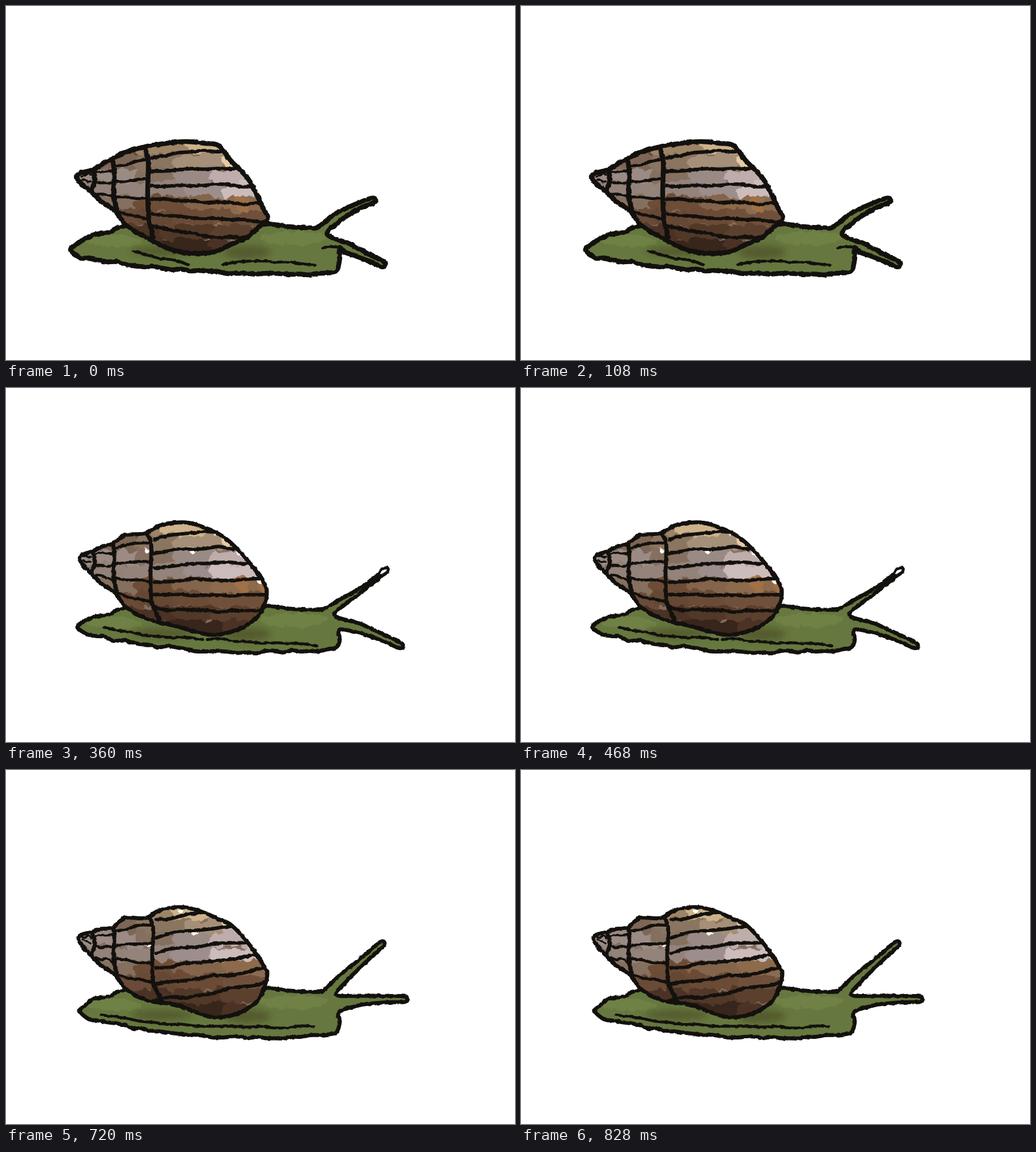
Recreate the animation shown at these times as an HTML page. Size 898 px wide and 624 px high, loop 0.9 s.

```html
<!DOCTYPE html>
<html lang="en">
<head>
<meta charset="utf-8">
<title>Crawling snail</title>
<style>
html, body { margin: 0; width: 100%; height: 100%; overflow: hidden; background: #fff; }
svg { display: block; width: 100%; height: 100%; }
.pose { opacity: 0; animation: pose 900ms step-end infinite; }
.ink { fill: none; stroke: #13110e; stroke-linecap: round; stroke-linejoin: round; }
@keyframes pose { 0% { opacity: 1; } 20%, 100% { opacity: 0; } }
</style>
</head>
<body>
<svg id="stage" viewBox="0 0 898 624">
  <defs>
    <filter id="rough" filterUnits="userSpaceOnUse" x="0" y="0" width="898" height="624" color-interpolation-filters="sRGB">
      <feTurbulence type="fractalNoise" baseFrequency=".13" numOctaves="2" seed="4" result="noise"/>
      <feDisplacementMap in="SourceGraphic" in2="noise" scale="4" xChannelSelector="R" yChannelSelector="G"/>
    </filter>
    <filter id="brush" filterUnits="userSpaceOnUse" x="0" y="0" width="898" height="624" color-interpolation-filters="sRGB">
      <feTurbulence type="fractalNoise" baseFrequency=".07" numOctaves="2" seed="9" result="noise"/>
      <feDisplacementMap in="SourceGraphic" in2="noise" scale="14" xChannelSelector="R" yChannelSelector="G"/>
    </filter>
    <filter id="soft" filterUnits="userSpaceOnUse" x="0" y="0" width="898" height="624">
      <feGaussianBlur stdDeviation="6"/>
    </filter>
  </defs>
</svg>
<script>
// Key points of each pose; everything between them follows from the rules below.
// horns: tip x, tip y, bend. folds: start, end, sag. bands: count, left y range, right y range.
const poses = [
  {
    pen: 8.5, apex: [125, 301], notch: 0, crown: [318, 239], shoulder: 246, edge: 357, rim: [462, 375], cheek: 408, belly: 432,
    seam: 0, bands: [6, [268, 390], [256, 412]], gaps: [],
    tail: [114, 430], fork: [567, 403], foot: 472, sag: 2, ripple: 2,
    horns: [[652, 341, -6], [669, 457, 0]],
    folds: [[225, 432, 322, 455, 0], [382, 456, 545, 456, -6], [559, 425, 597, 431, -3]]
  },
  {
    pen: 7, apex: [118, 303], notch: 6, crown: [305, 241], shoulder: 258, edge: 346, rim: [462, 363], cheek: 417, belly: 423,
    seam: 0, bands: [6, [264, 386], [262, 418]], gaps: [[254, 312], [302, 248], [336, 430]],
    tail: [114, 417], fork: [578, 402], foot: 461, sag: 11, ripple: 3,
    horns: [[671, 350, -5], [707, 461, 0]],
    folds: [[173, 428, 295, 440, 3], [362, 447, 538, 452, 3], [577, 422, 600, 427, 0]]
  },
  {
    pen: 7, apex: [129, 300], notch: 8, crown: [318, 237], shoulder: 257, edge: 341, rim: [460, 365], cheek: 418, belly: 420,
    seam: 5, bands: [6, [266, 389], [256, 390]], gaps: [[327, 286], [250, 285], [416, 293], [450, 341]],
    tail: [126, 422], fork: [580, 401], foot: 462, sag: 7, ripple: 2.5, eye: true,
    horns: [[672, 320, 4], [700, 456, -3]],
    folds: [[172, 420, 347, 442, 5], [355, 442, 548, 453, 1]]
  },
  {
    pen: 7.5, apex: [129, 304], notch: 8, crown: [328, 241], shoulder: 256, edge: 338, rim: [465, 378], cheek: 424, belly: 423,
    seam: 3, bands: [7, [270, 403], [254, 392]], gaps: [[325, 288], [446, 393]],
    tail: [123, 425], fork: [582, 398], foot: 465, sag: 14, ripple: 4,
    horns: [[669, 302, 2], [706, 406, -2]],
    folds: [[182, 424, 527, 452, 11]]
  },
  {
    pen: 7, apex: [127, 297], notch: 13, crown: [315, 242], shoulder: 263, edge: 344, rim: [461, 362], cheek: 421, belly: 414,
    seam: 8, bands: [6, [266, 405], [250, 372]], gaps: [[332, 284], [251, 311], [308, 247]],
    tail: [130, 425], fork: [583, 396], foot: 467, sag: 9, ripple: 2,
    horns: [[667, 303, 0], [708, 404, -2]],
    folds: [[168, 433, 543, 451, 10]]
  }
];

// Shell tones by column, from top to bottom.
const tones = [
  [200, '#694e3b #7d6655 #9b8b84 #93827a #85705f #6a4b37 #543a2b #4b3225'],
  [275, '#9d8466 #8a7560 #85705f #94837b #6d4d36 #654833 #4b3225 #38251c'],
  [335, '#cdb28a #a58f78 #9a8a86 #9d8e8c #84644b #6b4b35 #523827 #38251c'],
  [410, '#edd3ab #e5caa4 #bfadab #cdbcbc #8d6a4b #70503a #5c402e #4b3225']
].map(([x, row]) => [x, row.split(' ')]);

function random(seed) {
  return () => {
    seed = (seed * 16807) % 2147483647;
    return seed / 2147483647;
  };
}

const mix = (a, b, t) => a + (b - a) * t;
const range = n => Array.from({ length: n }, (_, i) => i);

// Smooth curve through the points, as cubic segments.
function curve(p, closed) {
  const n = p.length;
  const at = i => closed ? p[(i + n) % n] : p[Math.max(0, Math.min(n - 1, i))];
  let d = 'M' + p[0];
  for (let i = 0; i < (closed ? n : n - 1); i++) {
    const [a, b, c, e] = [at(i - 1), at(i), at(i + 1), at(i + 2)];
    const h1 = b.map((v, k) => v + (c[k] - a[k]) / 6);
    const h2 = c.map((v, k) => v - (e[k] - b[k]) / 6);
    d += `C${h1} ${h2} ${c}`;
  }
  return closed ? d + 'Z' : d;
}

const ink = (d, w) => `<path class="ink" stroke-width="${w}" d="${d}"/>`;
const blob = (x, y, rx, ry, color, turn = 0) =>
  `<ellipse rx="${rx}" ry="${ry}" fill="${color}" transform="translate(${x} ${y}) rotate(${turn})"/>`;

function shellPoints({ apex: [ax, ay], notch, crown: [cx, cy], shoulder, edge, rim, cheek, belly }) {
  return [
    [ax, ay], [ax + 7, ay - 7], [150, ay - 11], [168, 280], [188, 269 + notch * .7], [210, 258 + notch * .2],
    [246, 248 + notch], [275, cy + 4], [cx, cy], [350, mix(cy, shoulder, .45)], [375, shoulder], [397, 273],
    [428, 306], [454, edge], rim, [448, cheek - 20], [425, cheek], [400, cheek + 11], [360, 435],
    [300, belly], [252, mix(405, belly, .2)], [214, 388], [193, 362], [170, 346], [150, 327], [ax + 7, ay + 12]
  ];
}

// Both sides of a tapering horn, from root to tip and back.
function horn([rx, ry], [tx, ty, bend], thin) {
  const len = Math.hypot(tx - rx, ty - ry);
  const nx = (ty - ry) / len, ny = (rx - tx) / len;
  const side = (t, s) => {
    const w = s * (thin + 6 * (1 - t) ** 2);
    return [mix(rx, tx, t) + nx * w, mix(ry, ty, t) + ny * w + bend * Math.sin(Math.PI * t)];
  };
  const steps = [.25, .45, .7, .95];
  return [...steps.map(t => side(t, 1)), [tx, ty], ...steps.reverse().map(t => side(t, -1))];
}

function bodyPoints({ tail: [tx, ty], fork: [fx, fy], foot, sag, ripple, horns, eye }, rnd) {
  const sole = range(28).map(i => {
    const u = (i + .3) / 28;
    const y = mix(foot, ty + 11, u ** 2.2) + sag * Math.sin(Math.PI * u);
    return [mix(572, tx + 6, u), y + (rnd() - .5) * 2 * ripple];
  });
  return [
    [tx, ty], [tx + 9, ty - 9], [152, 404], [182, 399], [207, 388], [300, 370], [440, 384],
    [463, 384], [500, 389], [fx - 30, 391], [fx - 17, fy - 13],
    ...horn([fx - 10, fy - 10], horns[0], eye ? 2.5 : 4.5), [fx, fy],
    ...horn([fx + 12, fy + 13], horns[1], 5),
    [588, 426], [589, 444], [583, foot - 5], ...sole
  ];
}

// A hand-drawn line that bows by sag.
function stroke(x0, y0, x1, y1, sag, shake, rnd) {
  const n = Math.max(3, Math.round((x1 - x0) / 24));
  return curve(range(n + 1).map(i => {
    const t = i / n;
    return [mix(x0, x1, t), mix(y0, y1, t) + sag * Math.sin(Math.PI * t) + (rnd() - .5) * shake];
  }));
}

// Lines spread evenly between two seams; the upper ones arch, the lower ones hang.
function fan(n, x0, x1, left, right, arch, w, rnd) {
  return range(n).map(i => {
    const t = i / (n - 1);
    return ink(stroke(x0, mix(...left, t), x1, mix(...right, t), mix(-arch, arch / 2, t), 5, rnd), w);
  }).join('');
}

function dabs(rnd) {
  let out = '';
  for (let row = 0; row < 8; row++) {
    for (let x = 115; x < 475; x += 22) {
      const px = x + (rnd() - .5) * 34;
      const near = tones.reduce((a, b) => Math.abs(b[0] - px) < Math.abs(a[0] - px) ? b : a);
      const orange = row === 4 && x > 405 && rnd() < .6;
      out += blob(x, 250 + row * 25 + (rnd() - .5) * 10, 21, 14, orange ? '#a07046' : near[1][row], rnd() * 40 - 10);
    }
  }
  return out;
}

function draw(p, i) {
  const rnd = random(4111 * (i + 3));
  const body = curve(bodyPoints(p, rnd), true);
  const shell = curve(shellPoints(p), true);
  const [ax, ay] = p.apex;
  const s = p.seam;
  const [n, left, right] = p.bands;
  const [ex, ey] = p.horns[0];
  const seams = [
    [[246, 254], [251 + s, 275], [250 + s, 330], [252 + s, 375], [260 + s * 2, 408]],
    [[188, 268], [191, 295], [190, 330], [196, 364]],
    [[153, 290], [157, 306], [151, 325]]
  ];
  return `
  <clipPath id="body${i}"><path d="${body}"/></clipPath>
  <clipPath id="shell${i}"><path d="${shell}"/></clipPath>
  <g class="pose" style="animation-delay:${(i - poses.length) * 180}ms"><g filter="url(#rough)">
    <path fill="#66783f" d="${body}"/>
    <g clip-path="url(#body${i})">
      <g filter="url(#brush)" opacity=".7">${blob(190, 414, 48, 11, '#748549')}${blob(510, 409, 58, 12, '#748549')}</g>
      <g filter="url(#soft)" opacity=".7">${blob(275, 432, 55, 9, '#4d5027')}${blob(425, 434, 42, 12, '#4d5027')}</g>
    </g>
    ${p.folds.map(f => ink(stroke(...f, 4, rnd), 5)).join('')}
    ${ink(body, p.pen)}
    ${p.eye ? `<ellipse class="ink" style="fill:#fff" stroke-width="5" rx="10" ry="5" transform="translate(${ex - 6} ${ey + 4}) rotate(-38)"/>` : ''}
    <path fill="#836e60" d="${shell}"/>
    <g clip-path="url(#shell${i})">
      <g filter="url(#brush)">${dabs(rnd)}${p.gaps.map(([x, y]) => blob(x, y, 6, 4, '#fff')).join('')}</g>
      ${fan(n, 257 + s, 466, left, right, 7, 6.2, rnd)}
      ${fan(4, 193, 248 + s, [283, 360], [272, 375], 1, 5.2, rnd)}
      ${fan(3, 158, 188, [294, 330], [291, 336], 1, 4.5, rnd)}
      ${fan(2, ax + 8, 150, [ay - 2, ay + 4], [ay - 3, ay + 8], 1, 3.5, rnd)}
      ${seams.map(q => ink(curve(q), p.pen)).join('')}
    </g>
    ${ink(shell, p.pen)}
  </g></g>`;
}

document.getElementById('stage').insertAdjacentHTML('beforeend', poses.map(draw).join(''));
</script>
</body>
</html>
```
